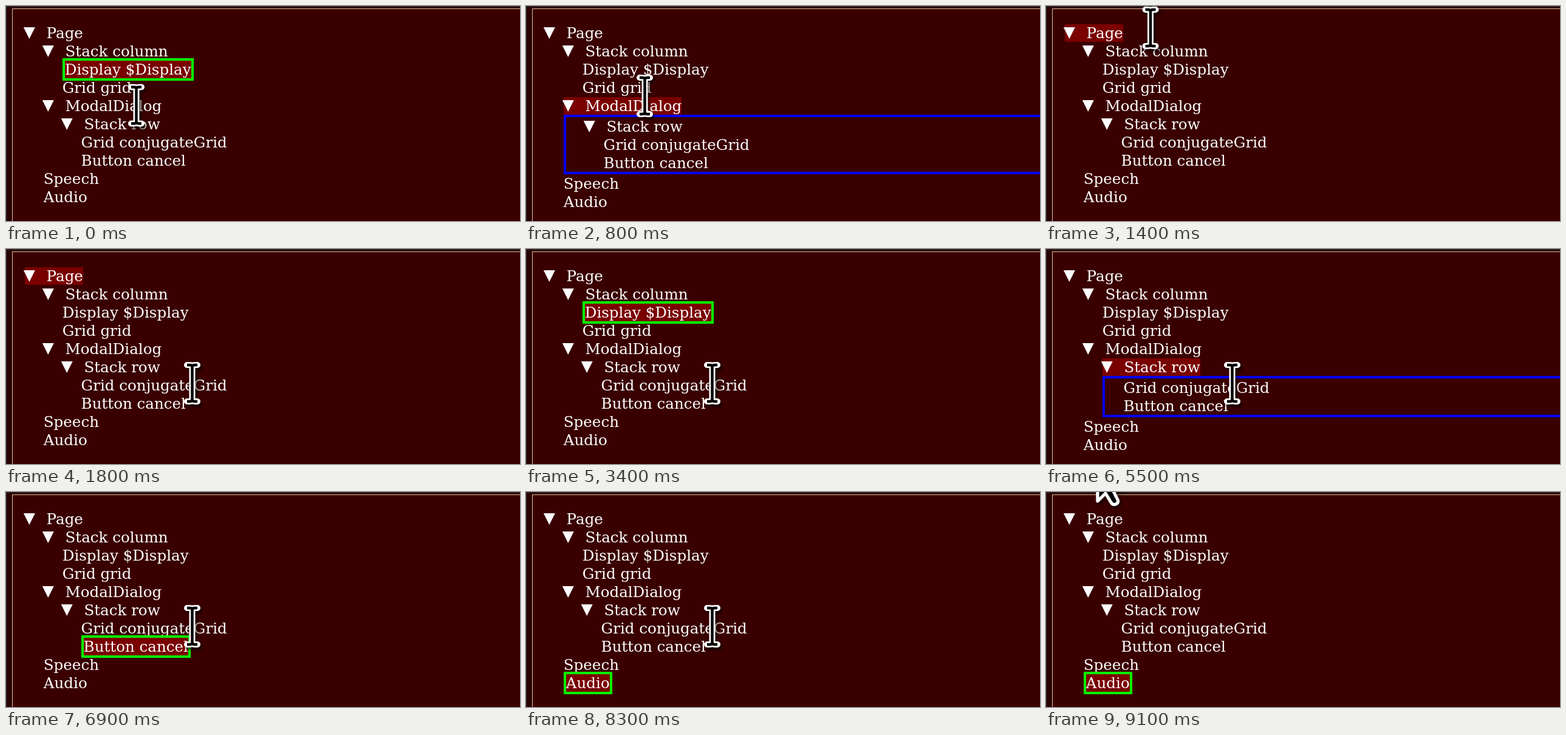
An HTML page with a canvas that plays this animation: 846 by 354 pixels, repeating every 9.5 s.

```html
<!DOCTYPE html>
<html lang="en">
<head>
<meta charset="utf-8">
<title>Tree navigation</title>
<style>
  html, body { margin: 0; width: 100%; height: 100%; overflow: hidden; background: #3a0000; }
  canvas { display: block; }
</style>
</head>
<body>
<canvas id="stage" width="846" height="354"></canvas>
<script>
const ctx = document.getElementById('stage').getContext('2d');
const W = 846, H = 354, LOOP = 9500;
const ROW = 30, TOP = 30, INDENT = 30.9, LABEL = 35.7, BORDER = 4;

// depth, label, number of descendants
const rows = [
  [1, 'Page', 9],
  [2, 'Stack column', 2],
  [3, 'Display $Display', 0],
  [3, 'Grid grid', 0],
  [2, 'ModalDialog', 3],
  [3, 'Stack row', 2],
  [4, 'Grid conjugateGrid', 0],
  [4, 'Button cancel', 0],
  [2, 'Speech', 0],
  [2, 'Audio', 0]
].map(([depth, label, kids]) => ({ depth, label, kids }));

// start time, selected row
const selection = [
  [0, 2], [400, 4], [500, 5], [600, 8], [700, 9], [800, 4],
  [1000, 3], [1100, 2], [1200, 1], [1400, 0], [2400, 1], [3400, 2],
  [4000, 3], [4600, 4], [5500, 5], [6200, 6], [6900, 7], [7600, 8], [8300, 9]
];

// start time, x, y, shape
const pointer = [
  [0, 214.5, 163.5, beam], [200, 215.5, 163.5, beam],
  [400, 214, 205, beam], [500, 209, 272, beam], [600, 203, 315, beam],
  [700, 198, 190, beam], [800, 195.5, 148, beam], [900, 194, 132, beam],
  [1000, 190, 112, beam], [1100, 184, 90, beam], [1200, 176, 66, beam],
  [1300, 170, 46, beam], [1400, 172, 36, beam], [1500, 205, 74, beam],
  [1600, 252, 138, beam], [1700, 290, 196, beam], [1800, 306.5, 221, beam],
  [8700, 146.5, 30, beam], [8800, 0, 0, null],
  [9000, 48, -4, arrow], [9100, 85, 0, arrow]
];

function at(track, t) {
  let step = track[0];
  for (const s of track) if (s[0] <= t) step = s;
  return step;
}

function fill(color, x, y, w, h) {
  ctx.fillStyle = color;
  ctx.fillRect(Math.round(x), Math.round(y), Math.round(w), Math.round(h));
}

function frame(color, x, y, w, h) {
  ctx.strokeStyle = color;
  ctx.lineWidth = BORDER;
  ctx.strokeRect(Math.round(x) + BORDER / 2, Math.round(y) + BORDER / 2,
    Math.round(w) - BORDER, Math.round(h) - BORDER);
}

function drawPage() {
  fill('#2a0000', 0, 0, W, H);
  fill('#333333', 0, 0, W, 1);
  fill('#333333', 0, 0, 1, H);
  fill('#dcc09c', 10, 4, W, H);
  fill('#3a0000', 11, 5, W, H);
}

function drawTriangle(x, y) {
  ctx.beginPath();
  ctx.moveTo(x - 2, y + 5);
  ctx.lineTo(x + 17, y + 5);
  ctx.lineTo(x + 7.5, y + 24);
  ctx.fill();
}

function drawTree(selected) {
  const open = rows[selected];
  const boxed = selected > 0 && open.kids > 0;
  const last = selected + open.kids;
  ctx.font = "24.55px 'DejaVu Serif', serif";

  rows.forEach((row, i) => {
    const inside = boxed && i > selected && i <= last;
    const below = boxed && i > last;
    const x = row.depth * INDENT + (inside ? BORDER : 0);
    const y = TOP + i * ROW + (inside ? BORDER : below ? 2 * BORDER : 0);
    const width = ctx.measureText(row.label).width;
    const chosen = i === selected;
    let textX = row.kids ? x + LABEL : x;

    if (chosen && row.kids) {
      fill('#7a0000', x, y, LABEL + width, 29);
    } else if (chosen) {
      const w = width + 2 * BORDER;
      fill('#7a0000', x, y - BORDER, w, 37);
      frame('#00ff00', x, y - BORDER, w, 37);
      textX += BORDER;
    }
    ctx.fillStyle = '#ffffff';
    if (row.kids) drawTriangle(x, y);
    ctx.fillText(row.label, textX, y + 23);
  });

  if (boxed) {
    frame('#0000ff', open.depth * INDENT, TOP + (selected + 1) * ROW - 1,
      W, open.kids * ROW + 2 * BORDER);
  }
}

function withShadow(draw) {
  ctx.save();
  ctx.shadowColor = 'rgba(0, 0, 0, 0.6)';
  ctx.shadowBlur = 4;
  ctx.shadowOffsetX = 3;
  ctx.shadowOffsetY = 4;
  draw();
  ctx.restore();
}

function beam() {
  const path = new Path2D();
  for (const side of [-1, 1]) {
    path.moveTo(-8.5, 30 * side);
    path.lineTo(-4, 30 * side);
    path.quadraticCurveTo(0, 30 * side, 0, 27 * side);
    path.quadraticCurveTo(0, 30 * side, 4, 30 * side);
    path.lineTo(8.5, 30 * side);
  }
  path.moveTo(0, -28);
  path.lineTo(0, 28);
  ctx.lineJoin = 'round';
  ctx.lineCap = 'round';
  ctx.strokeStyle = '#ffffff';
  ctx.lineWidth = 10;
  withShadow(() => ctx.stroke(path));
  ctx.lineCap = 'butt';
  ctx.strokeStyle = '#000000';
  ctx.lineWidth = 4.5;
  ctx.stroke(path);
}

function arrow() {
  const path = new Path2D('M0-38V15L13 2L22 17Q25 22 30 20Q35 17 33 13L24-5H40Z');
  ctx.lineJoin = 'round';
  ctx.strokeStyle = '#ffffff';
  ctx.lineWidth = 5;
  withShadow(() => ctx.stroke(path));
  ctx.fillStyle = '#000000';
  ctx.fill(path);
  ctx.stroke(path);
}

function drawPointer(t) {
  const [, x, y, shape] = at(pointer, t);
  if (!shape) return;
  ctx.save();
  ctx.translate(x, y);
  shape();
  ctx.restore();
}

let start = null;
function tick(now) {
  if (start === null) start = now;
  const t = (now - start) % LOOP;
  drawPage();
  drawTree(at(selection, t)[1]);
  drawPointer(t);
  requestAnimationFrame(tick);
}
requestAnimationFrame(tick);
</script>
</body>
</html>
```
